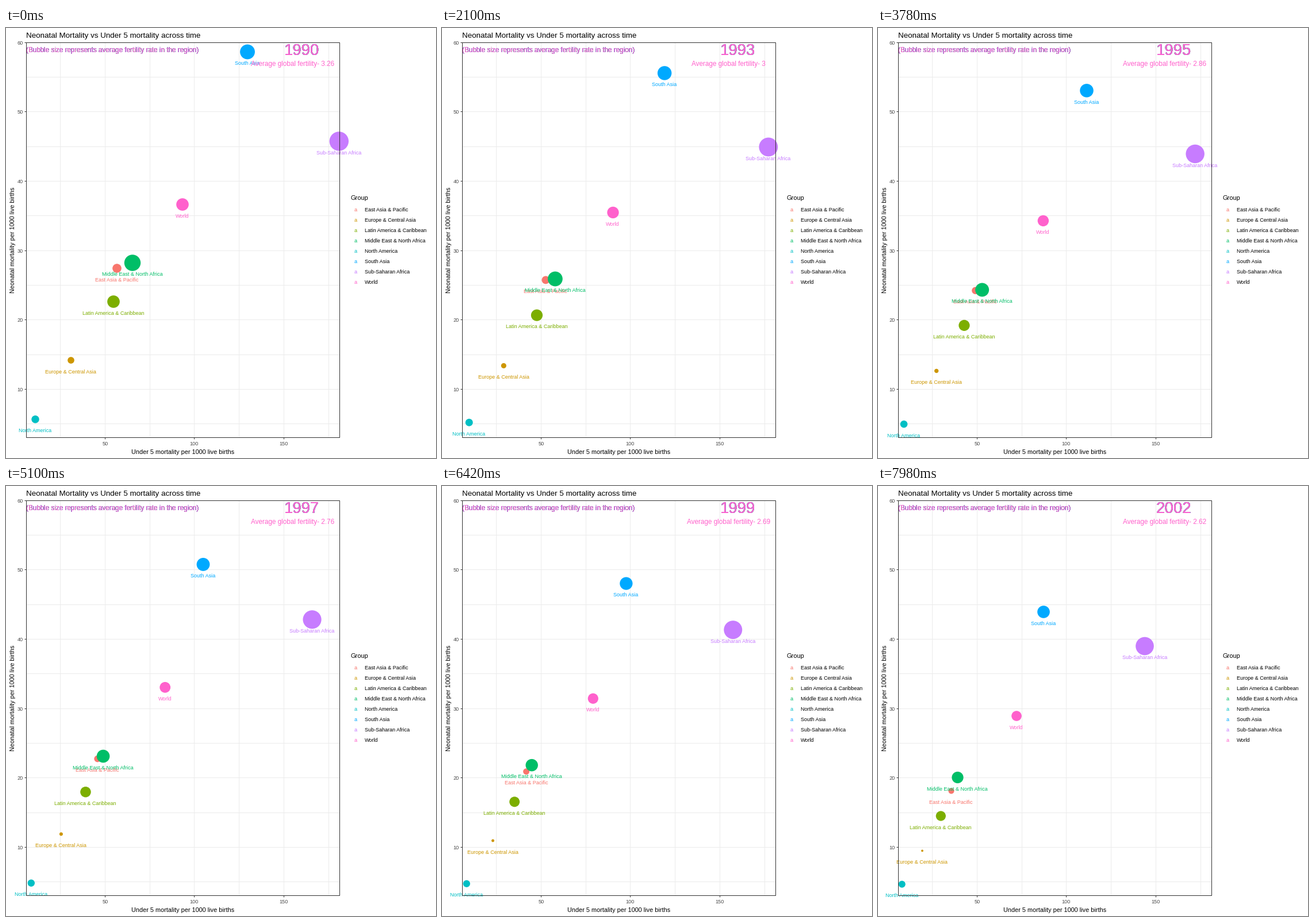
A matplotlib script for the animation above (8 s loop, 748 px wide and 748 px high).

```python
import numpy as np
import matplotlib.pyplot as plt
from matplotlib.animation import FuncAnimation
from matplotlib.patches import Circle, Rectangle

SIZE, DPI = 748, 88
PX = 72 / DPI                       # points per pixel
FRAMES, INTERVAL, STEP = 200, 40, 60
LAST_STEP = 133
YEARS_PER_STEP = 26 / 299
LEFT, TOP, RIGHT, BOTTOM = 35.5, 25.5, 580.5, 712.5
GRID, DARK, TICK = "#EBEBEB", "#333333", "#4D4D4D"
PINK = "#FF61CC"

# name: colour, x (start, end, bend), y (start, end, bend), radius (start, end)
GROUPS = {
    "East Asia & Pacific":
        ("#F8766D", (193, 127.5, .47), (418, 530.5, .53), (7.8, 5)),
    "Europe & Central Asia":
        ("#CD9600", (113, 77, .65), (578, 634.5, .6), (5.8, 1.9)),
    "Latin America & Caribbean":
        ("#7CAE00", (187, 109.3, 0), (476, 574, .22), (10.8, 8.6)),
    "Middle East & North Africa":
        ("#00BE67", (220, 138.5, 0), (408.5, 507, 0), (14.2, 10.1)),
    "North America":
        ("#00BFC4", (51, 41.7, -.65), (680.7, 692.7, -.9), (6.7, 6)),
    "South Asia":
        ("#00A9FF", (420, 288, .18), (41.5, 219, .39), (12.9, 10.8)),
    "Sub-Saharan Africa":
        ("#C77CFF", (579.3, 464, .95), (197, 278.5, .83), (16.7, 15.8)),
    "World":
        (PINK, (307, 241, .72), (307, 400, .69), (10.8, 8.8)),
}

plt.rcParams["font.family"] = "Liberation Sans"
plt.rcParams["path.snap"] = False
fig = plt.figure(figsize=(SIZE / DPI, SIZE / DPI), dpi=DPI, facecolor="white")
ax = fig.add_axes([0, 0, 1, 1])
ax.set(xlim=(0, SIZE), ylim=(SIZE, 0))
ax.axis("off")


def write(x, y, text, px, color="black", ha="left", z=5, **kw):
    return ax.text(x, y, text, fontsize=px * PX, color=color, ha=ha,
                   va="baseline", zorder=z, **kw)


def line(xs, ys, color):
    ax.plot(xs, ys, color=color, lw=PX, zorder=1, solid_capstyle="butt")


def to_x(value):
    return np.floor(16.3 + 3.116 * value) + 0.5


def to_y(value):
    return np.floor(748.9 - 12.06 * value) + 0.5


def glide(u, start, end, bend):
    """Travel that lags by the bend and gathers speed towards the end."""
    lag = (bend + 0.45 * (u - 0.5)) * u * (1 - u)
    return start + (end - start) * (u - lag)


def fertility(years):
    return 2.56 + 0.7 * np.exp(-0.1228 * years ** 1.2)


def draw_axes():
    for value in range(25, 176, 25):
        x = to_x(value)
        line([x, x], [TOP, BOTTOM], GRID)
        if value % 50 == 0:
            line([x, x], [BOTTOM, BOTTOM + 3], DARK)
            write(x, 725.5, str(value), 9.1, TICK, "center")
    for value in range(5, 61, 5):
        y = to_y(value)
        if value < 60:
            line([LEFT, RIGHT], [y, y], GRID)
        if value % 10 == 0:
            line([LEFT - 3, LEFT], [y, y], DARK)
            write(30, y + 3.5, str(value), 9.1, TICK, "right")
    ax.add_patch(Rectangle((LEFT, TOP), RIGHT - LEFT, BOTTOM - TOP,
                           fill=False, ec=DARK, lw=PX, zorder=9))
    write(35, 17.4, "Neonatal Mortality vs Under 5 mortality across time", 13.4)
    write(307.5, 740.6, "Under 5 mortality per 1000 live births", 10.85,
          ha="center")
    write(15, 368.5, "Neonatal mortality per 1000 live births", 10.85,
          ha="center", rotation=90, rotation_mode="anchor")


def draw_legend():
    write(600, 299, "Group", 11)
    for i, (name, (color, *_)) in enumerate(GROUPS.items()):
        y = 319 + 18 * i
        write(608.3, y, "a", 9.1, color, "center")
        write(624, y, name, 9.05)


draw_axes()
draw_legend()

bubbles, labels, year_texts = {}, {}, []
for name, (color, *_) in GROUPS.items():
    bubbles[name] = ax.add_patch(Circle((0, 0), 1, fc=color, lw=0, zorder=3))
    labels[name] = write(0, 0, name, 9.05, color, "center", 4)
    # One copy per group, stacked, so the edges take on every hue
    write(185, 42, "(Bubble size represents average fertility rate in the region)",
          11.6, color, "center", 6)
    year_texts.append(write(514.7, 47, "", 27.6, color, "center", 6))
average = write(498.5, 66, "", 11.75, PINK, "center", 6)


def update(i):
    step = (i * INTERVAL + INTERVAL // 2) // STEP
    u = step / LAST_STEP
    for name, (_, xs, ys, (r0, r1)) in GROUPS.items():
        x, y = glide(u, *xs), glide(u, *ys)
        bubbles[name].center = x, y
        bubbles[name].radius = r0 + (r1 - r0) * u * (1.3 - 0.3 * u)
        labels[name].set_position((x - 0.3, y + 22.7))
    years = round(step * YEARS_PER_STEP)
    for text in year_texts:
        text.set_text(str(1990 + years))
    average.set_text(f"Average global fertility- {round(fertility(years), 2):g}")
    return [*bubbles.values(), *labels.values(), *year_texts, average]


anim = FuncAnimation(fig, update, frames=FRAMES, interval=INTERVAL,
                     init_func=lambda: update(0), repeat=True,
                     repeat_delay=0, blit=False)
plt.show()
```
